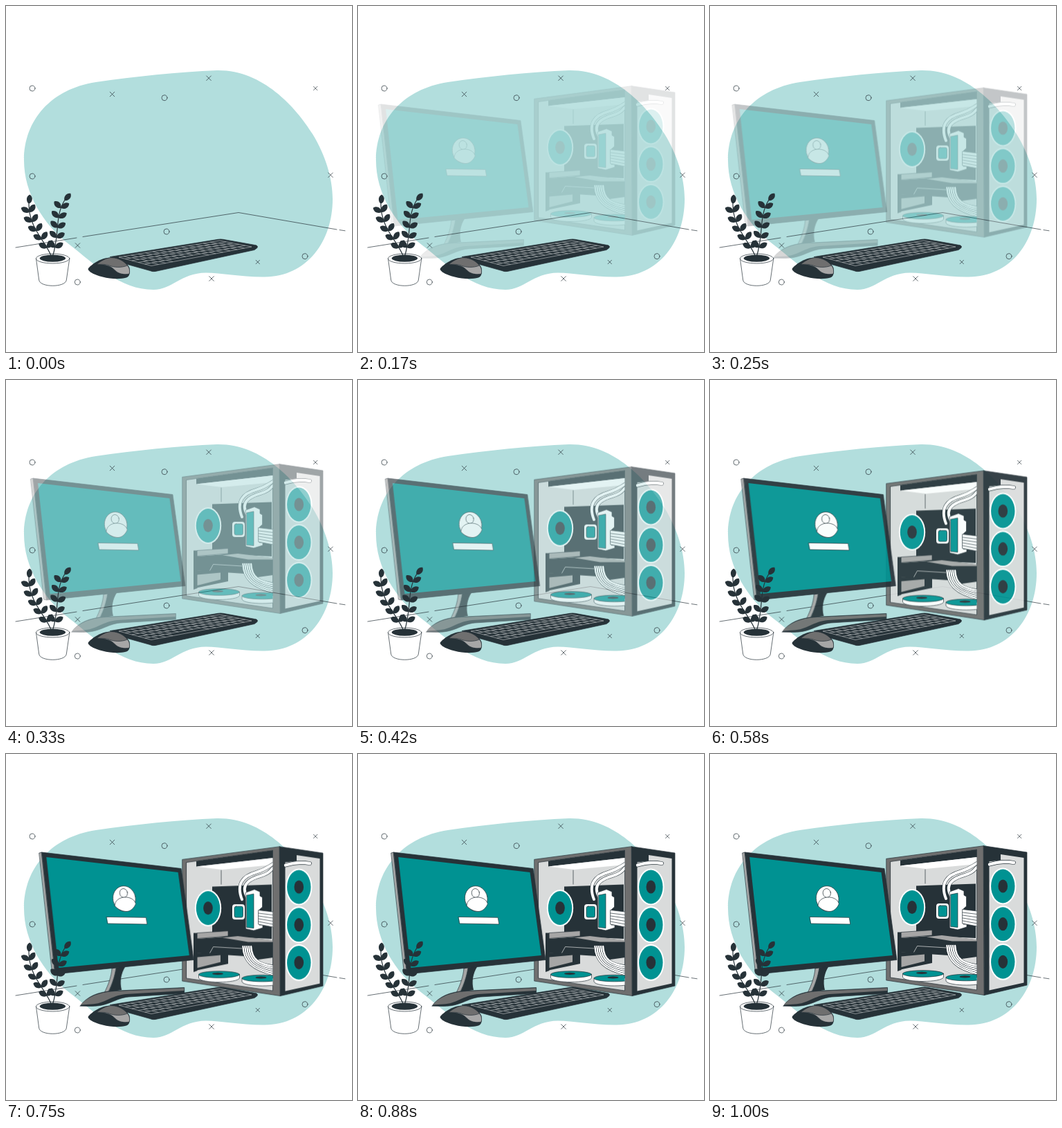
Recreate the animation shown at these times as an HTML page. Size 500 px wide and 500 px high, loop 1.04 s.

```html
<!DOCTYPE html>
<html lang="en">
<head>
<meta charset="utf-8">
<title>Desktop computer</title>
<style>
  html, body { margin: 0; width: 100%; height: 100%; overflow: hidden; background: #fff; }
  svg { display: block; width: 100vw; height: 100vh; }
  .ink { fill: #263238; }
  .grey { fill: #6f6f6f; }
  .light { fill: #a6a6a6; }
  .glass { fill: #d9dbdb; }
  .teal { fill: #009292; }
  .white { fill: #fff; }
  .line { stroke: #263238; stroke-width: .7; stroke-linejoin: round; stroke-linecap: round; }
  .open { fill: none; }
  .tube { fill: none; stroke: #fff; stroke-linecap: round; }
  .edge { stroke: #263238; }
  .tower, .monitor { animation: arrive 1040ms infinite; }
  .tower { --from: 0 -19.2px; }
  .monitor { --from: -19.2px 0; }
  @keyframes arrive {
    0% { opacity: 0; translate: var(--from); animation-timing-function: step-end; }
    7.692% { opacity: .039; translate: var(--from); animation-timing-function: cubic-bezier(.321, .23, .499, 1.354); }
    93.75%, 100% { opacity: 1; translate: 0 0; }
  }
</style>
</head>
<body>
<svg viewBox="0 0 500 500">
  <defs>
    <path id="leaf" d="M0 0C-4.5-2.5-6-10-.5-13.5C5.5-10.5 5-3 0 0Z"/>
    <circle id="ring" r="4"/>
    <path id="cross" d="M-3.3-3.3L3.3 3.3M-3.3 3.3L3.3-3.3"/>
    <path id="tick" d="M-2.7-2.7L2.7 2.7M-2.7 2.7L2.7-2.7"/>
    <g id="fan">
      <ellipse class="white" rx="19.2" ry="26.6"/>
      <ellipse class="teal" rx="17.2" ry="24.4"/>
      <ellipse class="ink" rx="6.8" ry="9.6"/>
    </g>
    <g id="flatFan">
      <path class="white line" d="M-29.5 0V5C-27 13 27 13 29.5 5V0Z"/>
      <ellipse class="teal line" rx="29.5" ry="4.8"/>
      <ellipse class="ink" cx="-2" cy="-1.1" rx="8" ry="1.6"/>
    </g>
    <clipPath id="inside"><path d="M261 155.5L385.5 138V341L261 323Z"/></clipPath>
  </defs>

  <path fill="#b2dedd" d="M305 93C370 92 418 145 443 185C462 216 472 250 472 279C472 340 435 391 374 391.5C340 392 312 385.5 289 385.5C252 386 240 410 213 410C165 410 128 373 92 345C53 315 26 270 26 223C26 165 65 120 130 110C185 102 250 95 305 93Z"/>
  <g class="line open">
    <path d="M14 349L102 335M111 333.5L336 298.5L478 323M482 323.6L490 324.8"/>
    <use href="#ring" x="38" y="119"/>
    <use href="#ring" x="229" y="132.7"/>
    <use href="#ring" x="38" y="246"/>
    <use href="#ring" x="232" y="326"/>
    <use href="#ring" x="432" y="361.7"/>
    <use href="#ring" x="103.3" y="399"/>
    <use href="#cross" x="153.5" y="127.5"/>
    <use href="#cross" x="293" y="104.3"/>
    <use href="#cross" x="469" y="244.3"/>
    <use href="#cross" x="103.5" y="346"/>
    <use href="#cross" x="297" y="394"/>
    <use href="#tick" x="447.2" y="119"/>
    <use href="#tick" x="363.8" y="370"/>
  </g>

  <g class="tower">
    <!-- side with window -->
    <path class="grey line" d="M255 151.3L395.5 132.7L396.5 348.5L255 327Z"/>
    <path class="glass line" d="M261 155.5L385.5 138V341L261 323Z"/>
    <g clip-path="url(#inside)">
      <path class="ink" d="M275 153.5L386 137.8V149L275 161.5Z"/>
      <path class="white" d="M275 161.5L386 149V159L312 166Z"/>
      <path class="line open" d="M311 167V187"/>
      <path class="ink" d="M298 190.5L384 187.5V266L298 262Z"/>
      <g id="tubes"></g>
      <use href="#fan" x="292" y="221.5"/>
      <rect class="white" x="327" y="216" width="18" height="22" rx="4"/>
      <rect class="teal line" x="330" y="219" width="12.500" height="16" rx="2.500"/>
      <path class="white line" d="M346.5 199L359 194.5L367 198V204L370.5 206V220L366 224V246H371V250L358 254L346.5 251.5Z"/>
      <path class="teal line" d="M348 203L358 201V250.5L348 249.5Z"/>
      <path class="white line" d="M365 224.5L386 227V249L365 245Z"/>
      <path class="line open" d="M365 229L386 231.5M365 233L386 236M365 237L386 240.5M365 241L386 245"/>
      <!-- cards and drive cage -->
      <path class="ink" d="M271 257.5H276.5V312L271 314Z"/>
      <path class="light line" d="M276.5 257.5L321 254.5V262L276.5 265.5Z"/>
      <path class="ink" d="M276 266L330 262L386 268.5V293L357 297L345 291L276 286.5Z"/>
      <path class="light" d="M313 264.3L335 262L386 268.3V270.5L350 270.5Z"/>
      <path class="open" stroke="#e4e6e6" stroke-width=".7" d="M294.5 286.5L299.5 277.5L342 280"/>
      <path class="ink" d="M273 286L321 288V302L273 312Z"/>
      <path class="light" d="M276.5 292.5L310 289.5V299.5L276.5 308Z"/>
      <g id="cables"></g>
      <use href="#flatFan" x="308" y="317.5"/>
      <use href="#flatFan" x="370.5" y="323"/>
    </g>
    <!-- front panel -->
    <path class="ink line" d="M395.5 132.7L458 142V334L396.5 348.5Z"/>
    <path class="glass" d="M403.5 155L420 153V145L453.5 150V330.5L403.5 341.5Z"/>
    <path class="tube edge" stroke-width="5.6" d="M404 159.5C416 155.500 428 155 439 157"/>
    <path class="tube" stroke-width="4.4" d="M404 159.5C416 155.500 428 155 439 157"/>
    <path class="ink" d="M396 133.5L420 137.5V153.5L396 156Z"/>
    <use href="#fan" x="423.3" y="191"/>
    <use href="#fan" x="423.3" y="245.7"/>
    <use href="#fan" x="423.3" y="300.3"/>
  </g>

  <g class="monitor">
    <path class="light line" d="M152 310L158 308.5C156 322 152 333 147 343L141 345C147 333 151 322 152 310Z"/>
    <path class="ink" d="M158 308.5L171.5 307C165 317 163 329 166 341L147 344C152 333 156 322 158 308.5Z"/>
    <path class="ink line" d="M106 364C116 350 132 344 152 342.5L256.5 337.5V346L176 351C156 353 148 364.5 122 364.5Z"/>
    <path class="grey" d="M107 362.5C117 350.5 133 345 152 343.2L256 338.2V342L172 347C150 349 142 361 122 361.5Z"/>
    <path class="light line" d="M47 143L50.5 142L70 318L66 317.2Z"/>
    <path class="ink line" d="M50.5 142L252 165.5L270 297.5L70 318Z"/>
    <path class="teal" d="M57.2 149L247.5 171L263.7 291L74.7 309Z"/>
    <g class="white line">
      <ellipse cx="169.7" cy="209" rx="16.3" ry="18.4" transform="rotate(-12 169.7 209)"/>
      <ellipse cx="168.8" cy="201" rx="5.6" ry="6.5" transform="rotate(-12 168.8 201)"/>
      <path d="M156 219.5C156 203.5 183 203 186.3 216.5C184 223 178 228 172 227.5C166 227 160 224 156 219.5Z"/>
      <path d="M144.3 235.5L201.2 236.3L202.8 246L146 245Z"/>
    </g>
  </g>

  <path class="ink line" d="M150.5 362.5L306 337.3Q310 336.5 314 337.3L361.5 345.8Q364.5 347 363 349.5L359 352.5L216 383.5Q212 384.3 208 382.5L174 373Z"/>
  <path id="keys" class="open" stroke="#c3c7c8" stroke-width=".6"/>

  <path class="ink" d="M119 379C122 375 136 363.5 152 363.5C166 363.5 178 373 178.700 380C179.2 386 178.5 391 174 392.5C160 396.5 135 393 122 384.5C119 382 118 380.5 119 379Z"/>
  <path class="light line" d="M131 373.5C140 373.5 150 374 157 381.5C163 388 172 388.5 178.3 387C179 382 178.5 378 175 374.5C165 369 150 371 131 373.5Z"/>
  <path class="grey line" d="M131 373.5C140 366 147 363.7 153 363.7C163 363.7 172 370 175.5 375C167 378.5 156 378 149 375C143 372.5 136 373.5 131 373.5Z"/>

  <g id="plant" class="ink">
    <path class="white line" d="M43.5 365L47.7 396C49 407 86 407 87.3 396L91.8 365Z"/>
    <ellipse class="white line" cx="67.6" cy="365" rx="24.2" ry="7"/>
    <ellipse cx="67.4" cy="364.6" rx="18.7" ry="5.2"/>
    <path id="stemLeft" class="line open" style="stroke-width:1.2" d="M66 363C58 340 33 322 33 286"/>
    <path id="stemRight" class="line open" style="stroke-width:1.2" d="M67 363C78 330 70 305 84.5 281"/>
  </g>
</svg>
<script>
  const byId = id => document.getElementById(id);
  const add = (id, markup) => byId(id).insertAdjacentHTML('beforeend', markup);

  // one leaf at the tip, then pairs at even steps down the stem
  const growLeaves = (stemId, tipAngle, leftAngle, rightAngle) => {
    const stem = byId(stemId), length = stem.getTotalLength();
    const leaf = (back, angle) => {
      const { x, y } = stem.getPointAtLength(length - back);
      add('plant', `<use href="#leaf" transform="translate(${x} ${y}) rotate(${angle})"/>`);
    };
    leaf(0, tipAngle);
    for (let i = 0; i < 5; i++) {
      leaf(12 + i * 14.5, leftAngle);
      leaf(12 + i * 14.5, rightAngle);
    }
  };
  growLeaves('stemLeft', 8, -61, 37);
  growLeaves('stemRight', 43, -44, 63);

  const tube = (d, width) =>
    `<path class="tube edge" stroke-width="${width}" d="${d}"/>` +
    `<path class="tube" stroke-width="${width - 1.1}" d="${d}"/>`;
  for (let i = 0; i < 2; i++) {
    const x = 341 + i * 7, y = 209 - i * 4, drop = i * 5;
    add('tubes', tube(`M${x} ${y}C${x - 9} ${186 + drop / 2} ${x + 2} ${175 + drop} ${x + 20} ${170 + drop}S380 ${159 + drop} 394 ${154 + drop}`, 5));
  }
  for (let i = 0; i < 5; i++) {
    const x = 342.5 + i * 2.9;
    add('cables', tube(`M${x} 277C${x + 1} 297 ${x + 12} ${311 - i * 2} 390 ${318 - i * 3}`, 3.6));
  }

  // key rows laid over the board's slanted top face
  const spot = (u, v) => {
    const x = 163 + 146 * u + 47 * v - u * v;
    const y = 363 - 24 * u + 12.5 * v - 3.5 * u * v;
    return `${x.toFixed(1)} ${y.toFixed(1)}`;
  };
  const rows = 5, cols = 14;
  let d = `M${spot(0, 0)}L${spot(0, 1)}M${spot(1, 0)}L${spot(1, 1)}`;
  for (let r = 0; r <= rows; r++) {
    d += `M${spot(0, r / rows)}L${spot(1, r / rows)}`;
    for (let c = 1; c < cols && r < rows; c++) {
      const spaceBar = r === rows - 1 && c > 3 && c < 8;
      const u = (c + r % 3 * .3 - .3) / cols;
      if (!spaceBar) d += `M${spot(u, r / rows)}L${spot(u, (r + 1) / rows)}`;
    }
  }
  byId('keys').setAttribute('d', d);
</script>
</body>
</html>
```
